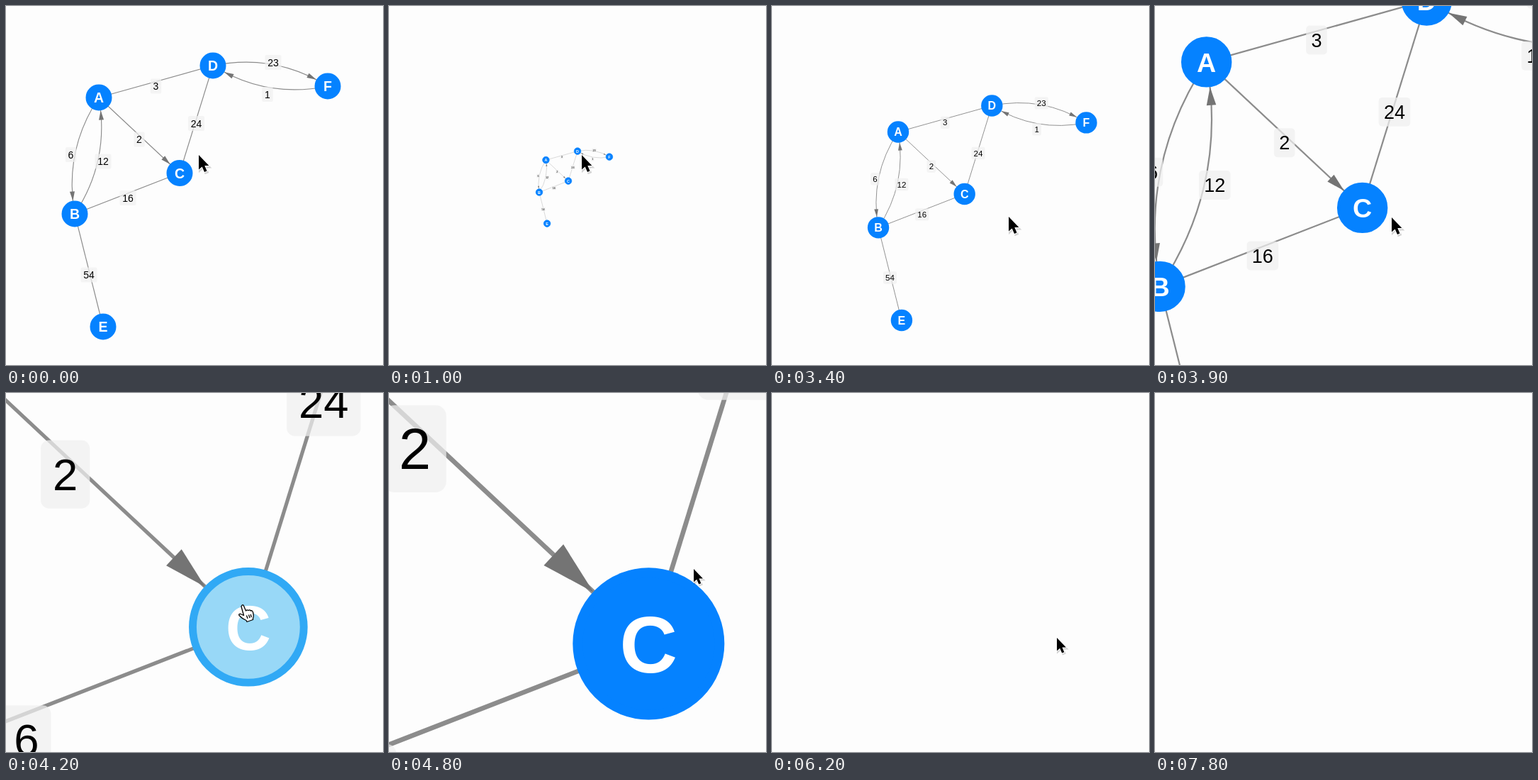
These frames come from a looping animation (532x506 px, 8 s). An HTML page:

```html
<!DOCTYPE html>
<html lang="en">
<head>
<meta charset="utf-8">
<title>Graph pan and zoom</title>
<style>
  html, body { margin: 0; width: 100%; height: 100%; overflow: hidden; background: #fdfdfd; }
  svg { display: block; width: 532px; height: 506px; }
  text { font-family: "Liberation Sans", Arial, sans-serif; text-anchor: middle; }
  .edge { fill: none; stroke: #8c8c8c; stroke-width: 1.15; }
  .head { fill: #747474; }
  .tag { fill: rgba(240, 240, 240, .72); }
  .weight { font-size: 14px; fill: #000; }
  .name { font-size: 19.5px; font-weight: bold; fill: #fff; }
  .node { fill: #0582ff; stroke: #0582ff; stroke-width: 2.4; }
  .node.hover { fill: #98d8f7; stroke: #31a9f5; }
  .shade { fill: #000; stroke: #000; stroke-width: 2; opacity: .16; }
  .arrow { fill: #000; stroke: #fff; stroke-width: 2.2; paint-order: stroke; stroke-linejoin: round; }
  .hand { fill: #fff; stroke: #000; stroke-width: 1.3; stroke-linejoin: round; }
</style>
</head>
<body>
<svg viewBox="0 0 532 506">
  <g id="graph"></g>
  <g id="cursor">
    <g id="pointer">
      <path class="shade" d="M1 2V23L5.8 18.6L9.3 26L13 24.4L9.7 17.4H16Z"/>
      <path class="arrow" d="M0 0V20.5L4.7 16.4L8 24L11.5 22.5L8.3 15.1H14.4Z"/>
    </g>
    <g id="hand">
      <path class="hand" d="M-2 2Q-1 -1 1 0L4.5 8Q6 6 8 7.5Q10 6 11.5 8Q13.5 7 14.5 10Q16 16 14.5 18.5V20.5L6 23.5L5 21.5Q-1 19 -5 14.5Q-6 12 -3 12.5L1.5 14.5Z"/>
      <path class="hand" d="M5.5 14.5L7 19M8.5 13.5L10 18M11.2 13L12.3 17"/>
    </g>
  </g>
</svg>
<script>
const LOOP = 8000, STEP = 100, R = 18.5;
const nodes = { A: [131, 129], B: [97, 293], C: [245, 235.5], D: [292, 84], E: [137, 452], F: [454, 113] };

// from, to, weight, label x, label y, bend, has arrowhead
const edges = [
  ['A', 'D', 3, 211.5, 113, 0, false],
  ['A', 'C', 2, 188, 188, 0, true],
  ['C', 'D', 24, 268.5, 165.5, 0, false],
  ['B', 'C', 16, 172, 270.5, 0, false],
  ['B', 'E', 54, 117, 379, 0, false],
  ['A', 'B', 6, 91.5, 209.5, .2, true],
  ['B', 'A', 12, 137, 219, .2, true],
  ['D', 'F', 23, 377, 79.5, -.2, true],
  ['F', 'D', 1, 369, 124.5, -.2, true],
];

// time, scale, offset x, offset y
const camera = [
  [0, 1, 0, 0], [300, 1, 0, 0], [1100, .2307, 197, 193], [1700, .2307, 197, 193],
  [2000, .2307, -30, -25], [2300, .2307, 112.3, 130.2], [2400, .2307, 150, 159],
  [2500, .2307, 180, 182], [2700, .2307, 204, 200.6], [2800, .2307, 204, 200.6],
  [3400, .822, 70.3, 71.5], [3600, .822, 70.3, 71.5], [4200, 4.53, -768, -737],
  [4400, 5.785, -1051, -1009], [4800, 5.785, -1051, -1009],
  [5400, 5.785, -1651, -1009], [LOOP, 5.785, -1651, -1009],
];

// time, x, y
const mouse = [
  [0, 272, 210], [1500, 272, 210], [1700, 335, 298], [2000, 108, 80], [2300, 262.5, 237],
  [2400, 300, 266], [2900, 334, 297], [3600, 334, 297], [4200, 334, 299], [4500, 334, 299],
  [4800, 430, 248], [5300, -40, 248], [5600, 89, 219], [5800, 256, 221], [6100, 226, 283],
  [6200, 402, 345], [7300, 402, 345], [7700, 406, 196], [LOOP, 406, 196],
];
const hidden = [[2500, 2900], [5300, 5600], [5900, 6100], [7800, LOOP]];

const byId = id => document.getElementById(id);
const graph = byId('graph'), cursor = byId('cursor'), pointer = byId('pointer'), hand = byId('hand');
const mix = (a, b, u) => a + (b - a) * u;

function add(tag, attrs, text) {
  const el = document.createElementNS('http://www.w3.org/2000/svg', tag);
  for (const key in attrs) el.setAttribute(key, attrs[key]);
  if (text !== undefined) el.textContent = text;
  return graph.appendChild(el);
}

function drawEdge([from, to, , , , bend, arrow]) {
  const [x1, y1] = nodes[from], [x2, y2] = nodes[to];
  const cx = (x1 + x2) / 2 - (y2 - y1) * bend;
  const cy = (y1 + y2) / 2 + (x2 - x1) * bend;
  add('path', { class: 'edge', d: `M${x1} ${y1}Q${cx} ${cy} ${x2} ${y2}` });
  if (!arrow) return;
  // Walk back along the curve to the rim of the end node.
  let t = 1, x, y;
  do {
    t -= .002;
    x = mix(mix(x1, cx, t), mix(cx, x2, t), t);
    y = mix(mix(y1, cy, t), mix(cy, y2, t), t);
  } while (Math.hypot(x - x2, y - y2) < R - .3);
  const turn = Math.atan2(mix(cy - y1, y2 - cy, t - .04), mix(cx - x1, x2 - cx, t - .04)) * 180 / Math.PI;
  add('path', { class: 'head', d: 'M0 0L-13.3 -3.5V3.5Z', transform: `translate(${x} ${y}) rotate(${turn})` });
}

function drawWeight([, , weight, x, y]) {
  const w = String(weight).length * 7.79 + 7.5;
  add('rect', { class: 'tag', x: x - w / 2, y: y - 10.6, width: w, height: 21.2, rx: 2.6 });
  add('text', { class: 'weight', x, y: y + 5 }, weight);
}

edges.forEach(drawEdge);
edges.forEach(drawWeight);
const discs = {};
for (const [name, [x, y]] of Object.entries(nodes)) {
  discs[name] = add('circle', { class: 'node', cx: x, cy: y, r: R - 1.2 });
  add('text', { class: 'name', x, y: y + 7.1 }, name);
}

function segment(keys, t) {
  let i = 1;
  while (i < keys.length - 1 && keys[i][0] <= t) i++;
  const a = keys[i - 1], b = keys[i];
  return [a, b, (t - a[0]) / (b[0] - a[0])];
}

function view(t) {
  const [a, b, u] = segment(camera, t);
  const s = a[1] * (b[1] / a[1]) ** u;
  // Offsets follow the scale so that a zoom keeps its centre still.
  const k = a[1] === b[1] ? u : (s - a[1]) / (b[1] - a[1]);
  return [s, mix(a[2], b[2], k), mix(a[3], b[3], k)];
}

function render(t) {
  const [s, ox, oy] = view(t);
  const [a, b, u] = segment(mouse, t);
  const x = mix(a[1], b[1], u), y = mix(a[2], b[2], u);
  const [cx, cy] = nodes.C;
  const over = Math.hypot(cx * s + ox - x, cy * s + oy - y) < R * s;
  const size = t < 4500 ? 1 : .9;

  graph.setAttribute('transform', `translate(${ox} ${oy}) scale(${s})`);
  discs.C.classList.toggle('hover', over);
  cursor.setAttribute('transform', `translate(${x} ${y})`);
  cursor.style.display = hidden.some(([from, to]) => t >= from && t < to) ? 'none' : '';
  pointer.setAttribute('transform', `scale(${size})`);
  pointer.style.display = over ? 'none' : '';
  hand.style.display = over ? '' : 'none';
}

function tick() {
  render(Math.floor(performance.now() % LOOP / STEP) * STEP);
  requestAnimationFrame(tick);
}
tick();
</script>
</body>
</html>
```
